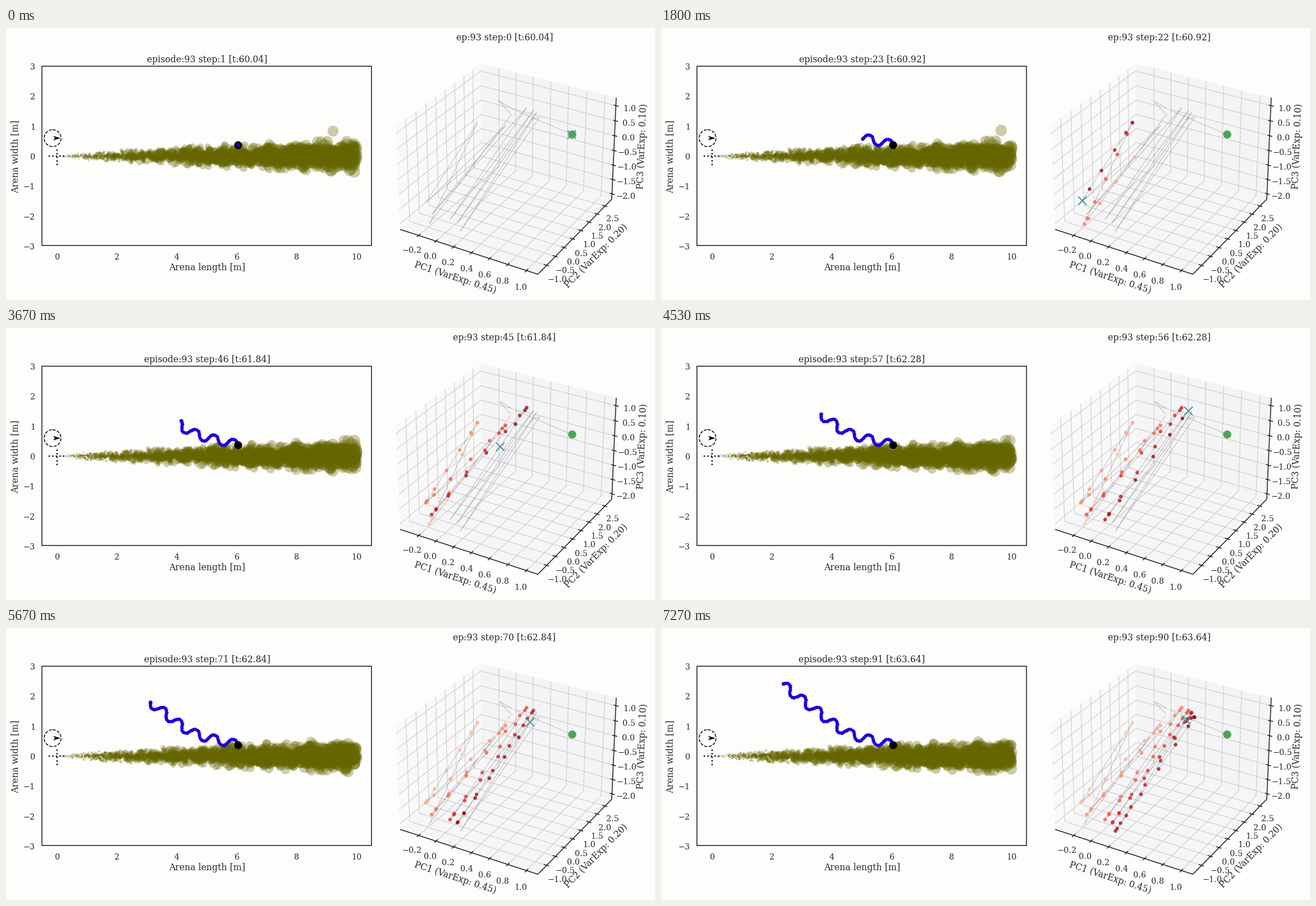
These frames come from a looping animation (1156x484 px, 7340 ms). A matplotlib script:

```python
import numpy as np
import matplotlib.pyplot as plt
from matplotlib.animation import FuncAnimation
from matplotlib.collections import LineCollection

W, H, DPI = 1156, 484, 100
STEPS, LOOP_MS = 91, 7340
PT = 72 / DPI                      # points per pixel
INK, BLUE = "#262626", "#1c00d8"
LABEL, TICK = 15.75 * PT, 14.35 * PT
SCALE, ORIGIN = 53.33, (91.3, 228)  # arena metres to pixels

plt.rcParams["font.family"] = "DejaVu Serif"
fig = plt.figure(figsize=(W / DPI, H / DPI), dpi=DPI, facecolor="#fdfdfc")
ax = fig.add_axes([0, 0, 1, 1])
ax.set(xlim=(0, W), ylim=(H, 0))
ax.axis("off")


def text(x, y, s, size=LABEL, ha="center", va="baseline", rotation=0):
    return ax.text(x, y, s, size=size, ha=ha, va=va, rotation=rotation, color=INK)


def tick_text(x, y, value, fmt="{:.1f}", ha="center"):
    text(x, y, fmt.format(value).replace("-", "\u2212"), TICK, ha, "center_baseline")


def area(diameter):
    return (diameter * PT) ** 2


def lines(segments, color, width, z):
    ax.add_collection(LineCollection(segments, colors=color, linewidths=width * PT, zorder=z))


# --- Arena -------------------------------------------------------------
ax.add_patch(plt.Rectangle((64, 68.3), 587, 319, fill=False, ec=INK, lw=1.6 * PT, zorder=6))
for m in range(0, 11, 2):
    tick_text(ORIGIN[0] + SCALE * m, 406.5, m, "{}")
for m in range(-3, 4):
    tick_text(52, ORIGIN[1] + 0.5 - SCALE * m, m, "{}", "right")
text(358, 431.3, "Arena length [m]")
text(16.5, 228.5, "Arena width [m]", va="center", rotation=90)
arena_title = text(358, 61, "")

for xs, ys in (((76, 107), (228, 228)), ((91.3, 91.3), (244, 213))):
    ax.plot(xs, ys, ":", color="black", lw=2.4 * PT, zorder=5)
ax.add_patch(plt.Circle((83, 196), 15, fill=False, ec="black", ls="--", lw=1.5 * PT, zorder=5))
ax.add_patch(plt.Polygon([(84, 192), (97, 196), (84, 200), (87, 196)], fc="black", zorder=5))

# Odour puffs drift downwind; lateral spread and size grow with distance.
# The last one is a stray far off the centre line.
rng = np.random.default_rng(93)
puff_x = np.append(rng.uniform(-1.9, 10, 2300), 9.21)
puff_y = np.append(np.clip(rng.normal(0, 1, 2300), -2.5, 2.5), -4.2)
puffs = ax.scatter([], [], color="#666600", alpha=0.32, linewidths=0, zorder=2)

# Constant speed with a meandering heading; the mean course turns once.
mid = np.arange(STEPS - 1) + 0.5
climb = np.radians(25 + 12.5 * np.tanh((mid - 33) / 8))
heading = np.pi - climb + 1.1 * np.sin(2 * np.pi * (mid - 3.8) / 13.9)
stride = 3.5 * np.column_stack([np.cos(heading), -np.sin(heading)])
flight = np.array([412.5, 208]) + np.vstack([[0, 0], np.cumsum(stride, axis=0)])

trail, = ax.plot([], [], "-o", color=BLUE, lw=4.2 * PT, ms=6 * PT, mew=0, zorder=3)
ax.scatter(*flight[0], s=area(14), color="black", linewidths=0, zorder=4)
head, = ax.plot([], [], "o", color=BLUE, ms=6.6 * PT, mew=0, zorder=5)

# --- Component space: perspective box from its far corner and vanishing points
CORNER = np.array([847, 237.5, 1])
AXES = np.array([-0.0473 * np.array([-3826, -1114, 1]),
                 -0.0799 * np.array([2517, -1155, 1]),
                 -0.0380 * np.array([888, 4650, 1])])


def project(*uvw):
    p = CORNER + np.array(uvw) @ AXES
    return p[:2] / p[2]


def segment(a, b):
    return [project(*a), project(*b)]


panes = [("#f9f9fa", [(0, 0, 0), (0, 1, 0), (0, 1, 1), (0, 0, 1)]),
         ("#f4f4f6", [(0, 0, 0), (1, 0, 0), (1, 0, 1), (0, 0, 1)]),
         ("#f6f6f8", [(0, 0, 0), (1, 0, 0), (1, 1, 0), (0, 1, 0)])]
for color, corners in panes:
    ax.add_patch(plt.Polygon([project(*c) for c in corners], fc=color, ec="none", zorder=1))

grid, marks = [], []
for u in 0.141 + 0.130 * np.arange(7):
    grid += [segment((u, 0, 0), (u, 1, 0)), segment((u, 0, 0), (u, 0, 1))]
    marks.append(segment((u, 0.98, 0), (u, 1.02, 0)))
for v in 0.890 - 0.113 * np.arange(8):
    grid += [segment((0, v, 0), (1, v, 0)), segment((0, v, 0), (0, v, 1))]
    marks.append(segment((0.98, v, 0), (1.016, v, 0)))
for w in 0.925 - 0.145 * np.arange(7):
    grid += [segment((0, 0, w), (0, 1, w)), segment((0, 0, w), (1, 0, w))]
    marks.append(segment((0.985, 0, w), (1.02, 0, w)))
edges = [segment((0, 1, 0), (1, 1, 0)), segment((1, 1, 0), (1, 0, 0)),
         segment((1, 0, 0), (1, 0, 1))]
lines(grid, "#cdcdcf", 1.2, 1.5)
lines(edges + marks, INK, 1.6, 2)

for start, end, values in (((723, 395), (917, 460), np.arange(-1, 6) * 0.2),
                           ((982, 446), (1081, 339), np.arange(-2, 6) * 0.5),
                           ((1111, 142.5), (1104, 298.5), np.arange(2, -5, -1) * 0.5)):
    for (x, y), value in zip(np.linspace(start, end, len(values)), values):
        tick_text(x, y, value)
text(800.5, 444, "PC1 (VarExp: 0.45)", va="center", rotation=-18)
text(1051, 406, "PC2 (VarExp: 0.20)", va="center", rotation=45.4)
text(1133.5, 211, "PC3 (VarExp: 0.10)", va="center", rotation=87.7)
space_title = text(888, 22, "")

# The state swings between turning points (step, x, y) with a sinusoidal pace.
turns = np.array([
    (0, 1007, 189), (1, 904, 145), (2, 877, 129), (3, 900, 154),
    (10, 754, 349), (16.5, 841, 166), (22.7, 747, 312), (28.8, 890, 173),
    (35, 758, 332), (42.3, 928, 141), (49, 791, 341), (56.3, 940, 146),
    (63.4, 803, 348), (71.6, 946, 149), (79.3, 809, 362), (86.3, 951, 158),
    (90, 935, 163)])


def swing(step):
    i = np.clip(np.searchsorted(turns[:, 0], step, side="right") - 1, 0, len(turns) - 2)
    a, b = turns[i], turns[i + 1]
    ease = (1 - np.cos(np.pi * (step - a[0]) / (b[0] - a[0]))) / 2
    return a[1:] + ease * (b[1:] - a[1:])


orbit = np.array([swing(k) for k in range(STEPS)])

ax.plot(*orbit.T, color="#808080", alpha=0.55, lw=0.9 * PT, zorder=3)
dots = ax.scatter([], [], s=area(6.6), linewidths=0, zorder=4)
cross, = ax.plot([], [], "x", color="#4c9494", ms=15 * PT, mew=2 * PT, zorder=5)
ax.scatter(1007.8, 188.7, s=area(14.5), color="#4fa557", linewidths=0, zorder=6)
reds = plt.get_cmap("Reds")


def draw(k):
    clock = f"[t:{60.04 + 0.04 * k:.2f}]"
    arena_title.set_text(f"episode:93 step:{k + 1} {clock}")
    space_title.set_text(f"ep:93 step:{k} {clock}")

    x = puff_x + 0.02 * k
    live = (x > 0) & (x < 10)
    x = x[live]
    y = 2.8 * x ** 0.6 * puff_y[live]
    puffs.set_offsets(np.column_stack([ORIGIN[0] + SCALE * x, ORIGIN[1] + y]))
    puffs.set_sizes(area(21 * (x / 10) ** 0.82))

    trail.set_data(*flight[:k + 1].T)
    head.set_data(*flight[k:k + 1].T)

    past = np.arange(1, max(k, 1))
    dots.set_offsets(orbit[past].reshape(-1, 2))
    dots.set_facecolors(reds(0.97 * past / max(k, 1), alpha=0.78))
    cross.set_data(*orbit[k:k + 1].T)
    return arena_title, space_title, puffs, trail, head, dots, cross


anim = FuncAnimation(fig, draw, frames=STEPS, interval=LOOP_MS / STEPS,
                     repeat=True, cache_frame_data=False)
plt.show()
```
